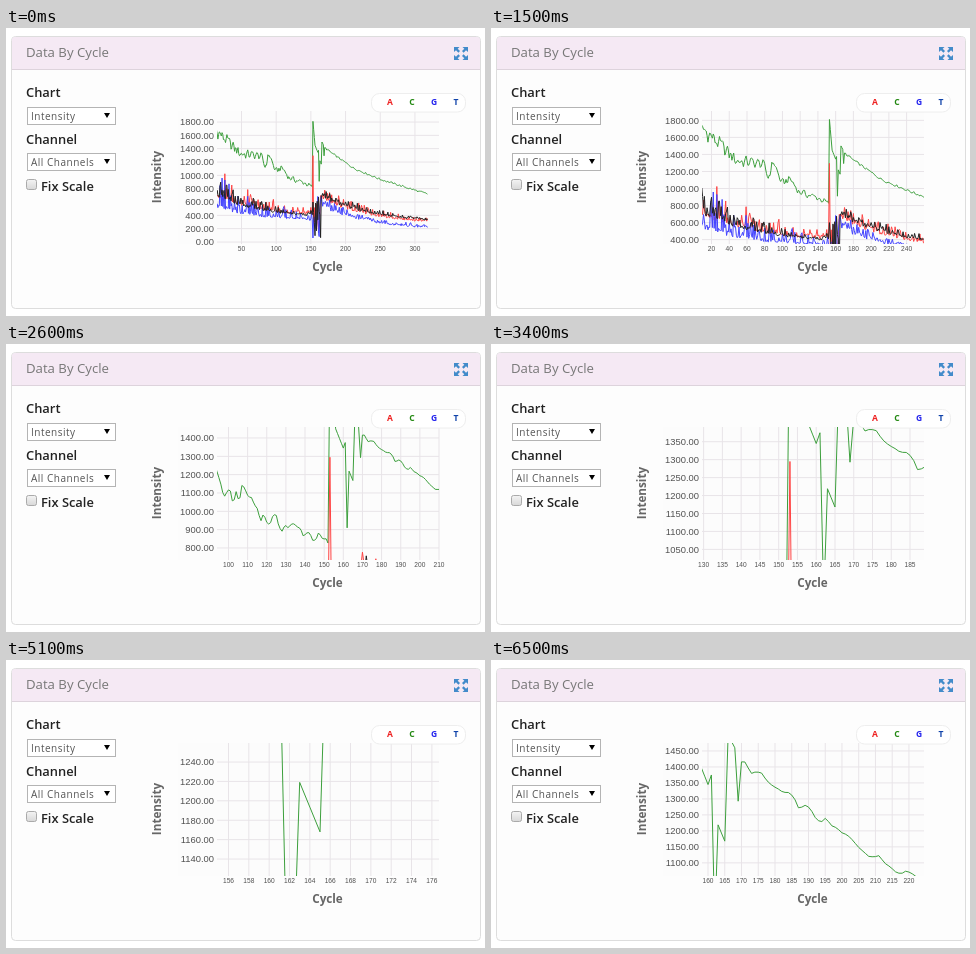
Write an HTML page that moves like this. It is 479 px wide and 288 px high and loops after 7100 ms.

```html
<!DOCTYPE html>
<html lang="en">
<head>
<meta charset="utf-8">
<title>Data By Cycle</title>
<style>
  html, body { margin: 0; width: 100%; height: 100%; overflow: hidden; background: #fff; }
  svg { display: block; width: 479px; height: 288px; font-family: "Open Sans", "Noto Sans", sans-serif; }
  .heading { font-size: 13.2px; fill: #777; }
  .field { font-size: 12.9px; font-weight: 600; fill: #222; }
  .option { font-size: 10px; letter-spacing: .5px; fill: #555; }
  .box { fill: #fff; stroke: #b4b4b4; }
  .title { font-size: 11.7px; font-weight: 700; fill: #666; text-anchor: middle; }
  .legend { font-size: 8.5px; font-weight: 700; text-anchor: middle; }
  .tick { font-family: "Liberation Sans", Arial, sans-serif; fill: #505050; }
  .x { font-size: 6.6px; text-anchor: middle; }
  .y { font-size: 9.4px; text-anchor: end; }
  .grid { stroke: #e8e4e8; fill: none; }
  .series { fill: none; stroke-width: 1; stroke-linejoin: round; }
</style>
</head>
<body>
<svg viewBox="0 0 479 288">
  <defs>
    <clipPath id="plot"><rect x="211" y="83" width="222" height="133"/></clipPath>
    <linearGradient id="check" x2="0" y2="1">
      <stop stop-color="#f4f4f4"/><stop offset="1" stop-color="#d8d8d8"/>
    </linearGradient>
    <path id="arrow" d="M-7-6.500h5.500l-1.800 1.800 2.300 2.300-1.600 1.600-2.400-2.400-2 1.800z"/>
    <path id="caret" d="M0 0h6l-3 5z"/>
  </defs>
  <rect x="5.5" y="8.5" width="469" height="272" rx="4" fill="#fdfdfd" stroke="#ddd"/>
  <path d="M6 41V12q0-3 3-3h462q3 0 3 3v29z" fill="#f5e9f4"/>
  <path d="M6 41.5H474" stroke="#ddd3dc"/>
  <text class="heading" x="20" y="28.5">Data By Cycle</text>
  <g transform="translate(455 25.500)" fill="#428bca">
    <use href="#arrow"/>
    <use href="#arrow" transform="scale(-1 1)"/>
    <use href="#arrow" transform="scale(1 -1)"/>
    <use href="#arrow" transform="scale(-1 -1)"/>
  </g>

  <text class="field" x="20" y="69">Chart</text>
  <rect class="box" x="21.5" y="79.5" width="88" height="17"/>
  <text class="option" x="25" y="91.5">Intensity</text>
  <use href="#caret" x="98" y="85"/>
  <text class="field" x="20" y="115.5">Channel</text>
  <rect class="box" x="21.5" y="125.5" width="88" height="17"/>
  <text class="option" x="25" y="137.5">All Channels</text>
  <use href="#caret" x="98" y="131"/>
  <rect x="20.5" y="151.5" width="10" height="10" rx="2" fill="url(#check)" stroke="#aaa"/>
  <text class="field" x="35" y="163">Fix Scale</text>

  <rect x="172" y="83" width="261" height="133" fill="#fcfcfc"/>
  <path id="grid" class="grid"/>
  <g id="lines" clip-path="url(#plot)"></g>
  <g id="ticks"></g>
  <text class="title" transform="translate(154.5 149) rotate(-90)">Intensity</text>
  <text class="title" x="321.5" y="243">Cycle</text>
  <rect x="365.5" y="65.5" width="94" height="18.5" rx="8" fill="#fff" stroke="#eee"/>
  <g class="legend">
    <text x="384" y="77" fill="#e22">A</text>
    <text x="406" y="77" fill="#281">C</text>
    <text x="428" y="77" fill="#22e">G</text>
    <text x="450" y="77" fill="#14a">T</text>
  </g>
</svg>
<script>
const LOOP = 7100, CYCLES = 318;
const READ_END = 153, READ_START = 165;
const PLOT = { left: 211, right: 433, top: 83, bottom: 216 };
const $ = id => document.getElementById(id);
const lerp = (a, b, k) => a + (b - a) * k;

function random(n, seed) {
  const v = Math.sin(n * 12.9898 + seed * 78.233) * 43758.5453;
  return v - Math.floor(v);
}

// Random walk between values spaced 1.6 cycles apart, from -1 to 1
function wobble(c, seed) {
  const t = c / 1.6, i = Math.floor(t);
  return 2 * lerp(random(i, seed), random(i + 1, seed), t - i) - 1;
}

// Main bends of channel C: cycle, value
const BENDS = [
  [1, 1190], [4, 1660], [12, 1690], [48, 1330], [78, 1290], [84, 1130], [90, 1320],
  [99, 1060], [109, 1110], [119, 960], [140, 890], [152, 827], [153, 1810], [156, 1450],
  [160, 1345], [161, 1375], [162, 910], [163, 1219], [165, 1168], [166, 1500], [168, 1460],
  [169, 1293], [170, 1416], [180, 1334], [212, 1105], [250, 940], [CYCLES, 720]
];

function channelC(c) {
  const i = Math.max(1, BENDS.findIndex(([cycle]) => cycle >= c));
  const [c0, v0] = BENDS[i - 1], [c1, v1] = BENDS[i];
  const sway = c < 152 ? 125 * Math.exp(-c / 130) : c > 170 ? 16 : 0;
  return lerp(v0, v1, (c - c0) / (c1 - c0)) + sway * wobble(c, 1);
}

// Two decaying reads with random spikes, split by an unstable stretch
function decaying(seed, first, second, jump) {
  return c => {
    if (c === READ_END) return jump;
    const r = random(c, seed);
    if (c > READ_END && c < READ_START) return 60 + r * 640;
    const [floor, height, spike] = c < READ_END ? first : second;
    const fade = Math.exp(-(c < READ_END ? c : c - READ_START) / 70);
    const jitter = 50 * (random(c, seed + 9) - .5) * (.4 + fade);
    return floor + height * fade + jitter + spike * r ** 4 * (.1 + fade);
  };
}

// Each read: floor, decaying height, spike height
const SERIES = [
  { color: '#3c9f3c', value: channelC },
  { color: '#f44', value: decaying(3, [360, 410, 470], [265, 420, 220], 1295) },
  { color: '#44f', value: decaying(4, [300, 290, 620], [180, 380, 150], 60) },
  { color: '#222', value: decaying(5, [350, 430, 330], [290, 420, 130], 600) }
];

// Visible ranges and the moments at which the view steps towards each of them
const VIEWS = [
  { x: [14.7, 334.7], y: [-30, 1965], steps: [] },
  { x: [-18.7, 301.4], y: [162, 2157], steps: [900, 1000] },
  { x: [48.3, 201.4], y: [610, 1564.6], steps: [1500, 1600, 2000] },
  { x: [94, 210], y: [734.5, 1460], steps: [2100, 2200, 2300, 2500, 2600] },
  { x: [151.5, 175.6], y: [1197, 1348.5], steps: [2800, 2900, 3400, 3500, 3900, 4000, 4200] },
  { x: [154.87, 176.7], y: [1122.5, 1259.6], steps: [4400, 4500, 4600, 5100] },
  { x: [158.2, 224.5], y: [1059, 1475], steps: [5400, 5500, 5600, 5700, 6000, 6100, 6200, 6300, 6400, 6500] }
];

// Constant zoom ratio per step around a fixed point
function blendRange(a, b, k) {
  const w0 = a[1] - a[0], w1 = b[1] - b[0];
  const f = Math.abs(w1 / w0 - 1) < .01 ? k : (w0 * (w1 / w0) ** k - w0) / (w1 - w0);
  return [lerp(a[0], b[0], f), lerp(a[1], b[1], f)];
}

function viewAt(time) {
  let view = VIEWS[0];
  for (let i = 1; i < VIEWS.length; i++) {
    const { steps } = VIEWS[i];
    const done = steps.filter(s => s <= time).length;
    if (!done) break;
    const k = done / steps.length, from = VIEWS[i - 1];
    view = { x: blendRange(from.x, VIEWS[i].x, k), y: blendRange(from.y, VIEWS[i].y, k) };
  }
  return view;
}

function ticks([lo, hi]) {
  const raw = (hi - lo) / 10;
  let step = 10 ** Math.floor(Math.log10(raw));
  const ratio = step / raw;
  step *= ratio <= .15 ? 10 : ratio <= .35 ? 5 : ratio <= .75 ? 2 : 1;
  const list = [];
  for (let v = Math.ceil(lo / step) * step; v <= hi; v += step) list.push(v);
  return list;
}

const cycles = Array.from({ length: CYCLES }, (_, i) => i + 1);
for (const s of SERIES) {
  s.data = cycles.map(s.value);
  s.path = document.createElementNS('http://www.w3.org/2000/svg', 'path');
  s.path.setAttribute('class', 'series');
  s.path.setAttribute('stroke', s.color);
  $('lines').append(s.path);
}

const label = (axis, x, y, text) => `<text class="tick ${axis}" x="${x}" y="${y}">${text}</text>`;

function draw({ x, y }) {
  const { left, right, top, bottom } = PLOT;
  const px = v => lerp(left, right, (v - x[0]) / (x[1] - x[0]));
  const py = v => lerp(bottom, top, (v - y[0]) / (y[1] - y[0]));
  const xs = ticks(x), ys = ticks(y);
  $('grid').setAttribute('d',
    xs.map(v => `M${px(v)} ${top}V${bottom}`).join('') +
    ys.map(v => `M${left} ${py(v)}H${right}`).join(''));
  $('ticks').innerHTML =
    xs.map(v => label('x', px(v), 223.4, v)).join('') +
    ys.map(v => label('y', 208, py(v) + 3.4, v.toFixed(2))).join('');
  for (const s of SERIES) {
    s.path.setAttribute('d', 'M' + s.data.map((v, i) => `${px(i + 1).toFixed(2)} ${py(v).toFixed(2)}`).join('L'));
  }
}

let shown = '';
function frame(now) {
  const view = viewAt(now % LOOP), key = JSON.stringify(view);
  if (key !== shown) draw(view);
  shown = key;
  requestAnimationFrame(frame);
}
draw(VIEWS[0]);
requestAnimationFrame(frame);
</script>
</body>
</html>
```
